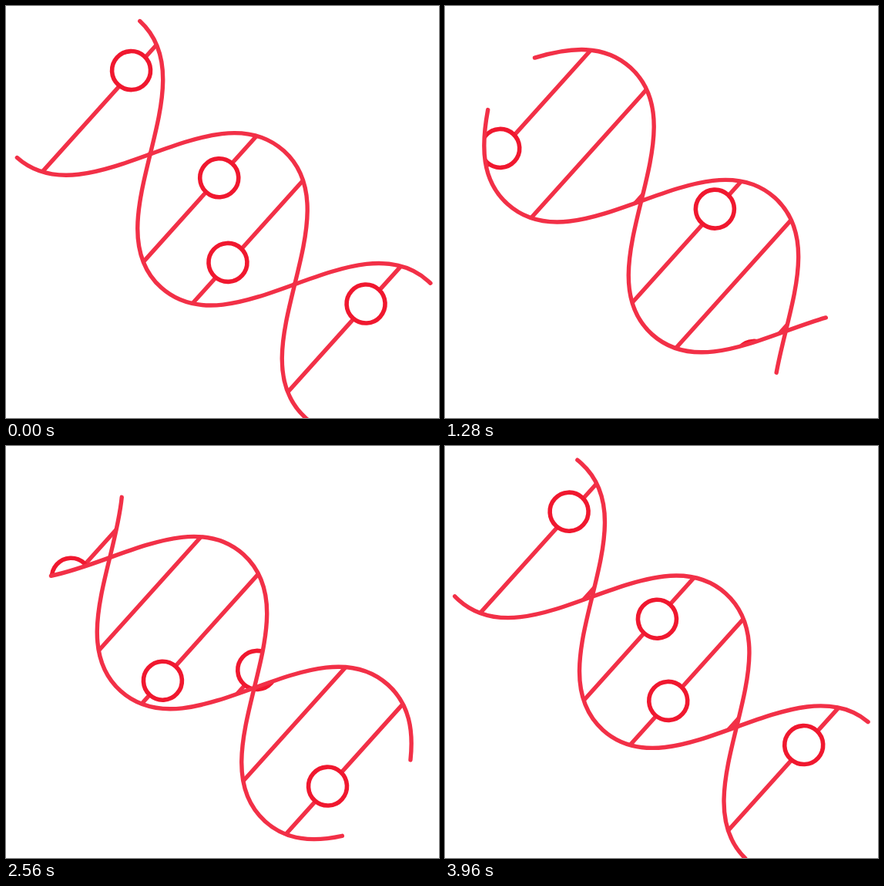
An HTML page that plays this animation: 562x534 px, repeating every 4 s.

```html
<!DOCTYPE html>
<html lang="en">
<head>
<meta charset="utf-8">
<title>Helix</title>
<style>
  html, body { margin: 0; width: 100%; height: 100%; overflow: hidden; background: #fff; }
  svg { display: block; width: 100vw; height: 100vh; }
  .strand, .rung { fill: none; stroke: #f23047; stroke-width: 5.4; stroke-linecap: round; }
  .bead { fill: #fff; stroke: #f0182f; stroke-width: 5.6; }
</style>
</head>
<body>
<svg viewBox="0 0 562 534">
  <clipPath id="inside"><path id="lens"/></clipPath>
  <!-- x runs along the helix axis, y across it -->
  <g transform="translate(-11.6 12.9) rotate(42)">
    <g id="rungs" clip-path="url(#inside)"></g>
    <g id="strands"></g>
  </g>
</svg>
<script>
const LOOP = 4000, STEP = 40;
const HALF = 252.3, AMP = 119.1, HANDLE = 125, START = 141.4, HALVES = 5;
const TRIM_LEAD = 0.001, TRIM_LENGTH = 1.004;

// Bead travel: [time, offset across the axis], linear between keys.
const rungs = [
  { x: 178.8, beadX: 176.7, keys: [[0, 64], [980, -122], [2000, 49], [2937, -121], [4000, 69]] },
  { x: 266.8 },
  { x: 354.4, beadX: 354.7, keys: [[0, 37], [980, -140], [2000, 32], [2937, -143], [4000, 42]] },
  { x: 437.8, beadX: 436.4, keys: [[0, -37], [1069, 100], [2000, -93], [2906, 89], [4000, -39]] },
  { x: 519.4 },
  { x: 606.6, beadX: 605.4, keys: [[0, 43], [1600, -80.4], [4000, 43]] }
];

function add(parent, tag, attrs) {
  const node = document.createElementNS('http://www.w3.org/2000/svg', tag);
  for (const name in attrs) node.setAttribute(name, attrs[name]);
  return parent.appendChild(node);
}

// Curve segments between successive crests, forward or backward.
function wave(y, backward) {
  let d = '';
  for (let i = 0; i < HALVES; i++) {
    const dir = backward ? -1 : 1;
    const x = (backward ? HALVES - i : i) * HALF;
    const end = x + dir * HALF;
    d += `C${x + dir * HANDLE},${y} ${end - dir * HANDLE},${-y} ${end},${-y}`;
    y = -y;
  }
  return d;
}

const byId = id => document.getElementById(id);
const lens = byId('lens');
const lastCrest = HALVES % 2 ? AMP : -AMP;
lens.setAttribute('d', `M0,${AMP}${wave(AMP)}L${HALVES * HALF},${lastCrest}${wave(lastCrest, true)}Z`);
lens.setAttribute('clip-rule', 'evenodd');

const strands = [AMP, -AMP].map(y => add(byId('strands'), 'path', {
  class: 'strand', d: `M0,${y}${wave(y)}`, pathLength: HALVES / 2, 'stroke-dasharray': `${TRIM_LENGTH} 9`
}));

for (const rung of rungs) {
  add(byId('rungs'), 'path', { class: 'rung', d: `M${rung.x},-130V130` });
  if (rung.keys) rung.bead = add(byId('rungs'), 'circle', { class: 'bead', cx: rung.beadX, r: 25 });
}

function valueAt(keys, t) {
  const i = keys.findIndex(key => key[0] > t);
  const [t0, v0] = keys[i - 1], [t1, v1] = keys[i];
  return v0 + (v1 - v0) * (t - t0) / (t1 - t0);
}

function draw() {
  const t = Math.floor(performance.now() % LOOP / STEP) * STEP;
  const phase = t / LOOP;
  const shift = `translate(${START - 2 * HALF * phase} 0)`;
  lens.setAttribute('transform', shift);
  for (const strand of strands) {
    strand.setAttribute('transform', shift);
    strand.setAttribute('stroke-dashoffset', -(phase + TRIM_LEAD));
  }
  for (const { bead, keys } of rungs) {
    if (bead) bead.setAttribute('cy', -valueAt(keys, t));
  }
  requestAnimationFrame(draw);
}
draw();
</script>
</body>
</html>
```
